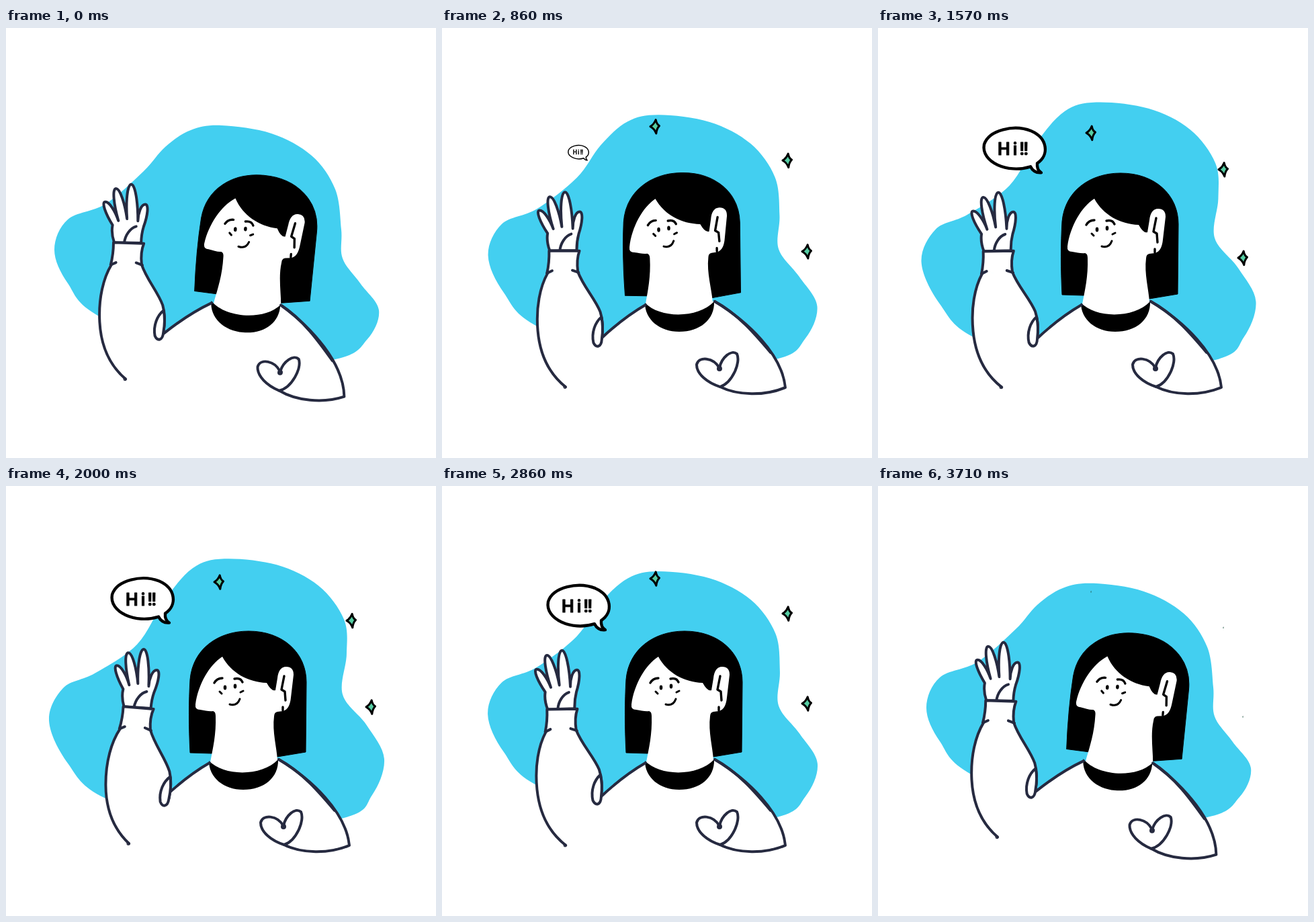
An HTML page that plays this animation: 640 by 640 pixels, repeating every 3780 ms.

```html
<!DOCTYPE html>
<html lang="en">
<head>
<meta charset="utf-8">
<title>Waving hello</title>
<style>
  html, body { margin: 0; width: 100%; height: 100%; overflow: hidden; background: #fff; }
  svg { display: block; width: 100vw; height: 100vh; }
  .ink { fill: none; stroke: #262a40; stroke-width: 4; stroke-linecap: round; stroke-linejoin: round; }
  .black { fill: none; stroke: #000; stroke-width: 3.4; stroke-linecap: round; stroke-linejoin: round; }
  .dot { fill: #262a40; }
  .white { fill: #fff; }
  text { font: 600 25px Inter, "Open Sans", sans-serif; stroke: #000; stroke-width: 1; stroke-linejoin: round; }
</style>
</head>
<body>
<svg viewBox="0 0 640 640">
  <defs>
    <path id="star" class="black" style="fill:#55cda3;stroke-width:3"
      d="M1.2-10Q2.5-3 6.5-1Q2.5 3 1.8 10.5Q-1 3-7 0Q-1.5-3 1.2-10Z"/>
  </defs>

  <path id="blob" fill="#43cff0"/>

  <path id="shirt" class="white" d="M236 463Q270 430 303 412L405 407C455 437 506 485 511 535C480 548 440 547 414 534L190 533Z"/>

  <g id="head">
    <path d="M274 397C272 360 272 320 274 288C278 243 315 216 361 216C412 216 447 248 447 292L446 396L404 403L305 398Z"
      stroke="#000" stroke-linejoin="round"/>
    <path class="white" d="M322 254C303 266 286 295 282 325Q281 333 289 333C296 334 303 336 308 335Q312 336 312 342
      C313 370 308 390 304 411C320 432 390 432 404 408C403 390 396 365 399 343Q399 337 404 336L412 335
      C420 333 423 325 424 315L428 281Q428 269 417 269C409 269 405 276 404 286L401 304Q395 306 388 293
      C360 292 335 278 322 254Z"/>
    <g class="black">
      <path d="M414 283L410 303L415 306L416 319M412 329V334"/>
      <path d="M310 293Q314 286 322 286M340 287Q349 285 352 292"/>
      <path d="M318 306L321 309M349 307L353 305M333 325Q344 328 348 317" stroke-width="3"/>
    </g>
    <ellipse cx="326" cy="300" rx="2.3" ry="3.4"/>
    <ellipse cx="341" cy="298" rx="2.3" ry="3.4"/>
  </g>

  <g id="torso">
    <path d="M302 409C325 433 382 432 405 407C406 434 384 452 353 452C324 452 302 434 302 409Z"/>
    <g class="ink">
      <path d="M236 463Q270 431 303 412"/>
      <path d="M406 407C455 437 506 485 511 535C480 548 440 547 414 534"/>
      <path d="M406 407C440 425 468 458 489 483"/>
      <path d="M414 534C395 528 379 515 379 501C382 488 404 490 413 506C416 490 431 478 439 485C445 498 432 528 414 534"/>
    </g>
    <circle class="dot" cx="413" cy="507" r="4"/>
  </g>

  <g id="arm" class="ink">
    <path class="white" stroke="none" d="M183 532C160 510 149 480 149 445C149 410 158 380 171 361H216L245 433L232 533Z"/>
    <path id="hand" class="white"/>
    <path d="M192 329C194 318 202 308 211 306"/>
    <path class="white" d="M170 361Q175 345 176 328L221 332Q215 345 216 363"/>
    <path d="M170 361L178 358M208 360L217 364"/>
    <path d="M183 532C160 510 149 480 149 445C149 410 158 380 171 361"/>
    <path class="white" d="M216 363C222 385 238 405 244 425C247 438 246 452 243 465"/>
    <path class="white" d="M245 433C235 440 228 455 230 470C233 478 241 479 243 465C246 452 246 440 245 433Z"/>
    <circle class="dot" cx="182" cy="532" r=".6"/>
  </g>

  <use id="starA" href="#star"/>
  <use id="starB" href="#star"/>
  <use id="starC" href="#star"/>

  <g id="bubble">
    <path class="black" style="fill:#fff;stroke-width:4.4" d="M34 22C52 10 50-15 25-26C0-36-38-28-45-6C-50 20-10 38 24 27
      Q29 37 40 36Q33 32 34 22Z"/>
    <text x="-25" y="10" dx="0 4 3 -2">Hi!!</text>
  </g>
</svg>

<script>
const LOOP = 3780, STEP = LOOP / 53;
const $ = id => document.getElementById(id);
const move = (id, transform) => $(id).setAttribute('transform', transform);
const ease = p => (1 - Math.cos(Math.PI * Math.min(1, Math.max(0, p)))) / 2;
const ramp = (t, start, end) => ease((t - start) / (end - start));
const swing = (t, peak, period) => Math.cos(2 * Math.PI * (t - peak) / period);

// Outline points: x, y and their shift when the blob is fully stretched
const blob = [
  [321, 145, 4, -37], [395, 157, 8, -40], [455, 190, 10, -42], [490, 240, 13, -42], [499, 300, 8, -50],
  [501, 343, 0, -33], [528, 381, 9, -25], [555, 420, 8, -14], [538, 463, 7, -3], [490, 493, 13, 1],
  [320, 510, 0, 10], [140, 430, 8, 35], [92, 380, 0, 33], [72, 330, -8, 20], [92, 285, -7, 16],
  [148, 262, -16, 17], [205, 213, -10, 23], [237, 177, -1, -7], [275, 152, 3, -30]
];

// Closed Catmull-Rom curve through the points
function smooth(points) {
  const at = i => points[(i + points.length) % points.length];
  const handle = (i, side) => at(i).map((v, k) => v + side * (at(i + 1)[k] - at(i - 1)[k]) / 6);
  return `M${at(0)}` + points.map((_, i) => `C${handle(i, 1)} ${handle(i + 1, -1)} ${at(i + 1)}`).join('') + 'Z';
}

// Round-tipped fingers rising between neighbouring knuckles
function handPath() {
  const knuckles = [[176, 302], [185, 296], [198, 294], [214, 298], [222, 307]];
  const tips = [[167, 267], [184, 248], [207, 243], [226, 274]];
  let d = `M177 328Q173 314 ${knuckles[0]}`;
  tips.forEach(([x, y], i) => {
    const edge = ([kx, ky], w) => [x + w + (kx - x) / 2, y + (ky - y) / 2];
    d += `C${edge(knuckles[i], -5)} ${x - 6} ${y} ${x} ${y}C${x + 6} ${y} ${edge(knuckles[i + 1], 5)} ${knuckles[i + 1]}`;
  });
  return d + 'Q218 318 217 331Z';
}

const bob = (t, middle, height, peak) => middle - height * swing(t, peak, 2250);

function drawStar(id, t, x, y, start) {
  const size = ramp(t, start, start + 260) * (1 - ramp(t, 3480, 3765));
  move(id, `translate(${x} ${y}) scale(${size})`);
}

function draw(t) {
  const stretch = ease(2 * t / LOOP) * (t < LOOP / 2) || (1 - swing(t, 0, LOOP)) / 2;
  $('blob').setAttribute('d', smooth(blob.map(([x, y, dx, dy]) => [x + dx * stretch, y + dy * stretch])));

  const lean = `rotate(${4.7 * (1 - ramp(t, 0, 900) + ramp(t, 3210, 3680))} 340 449)`;
  move('shirt', lean);
  move('torso', lean);
  const tilt = 5.2 - 7 * ramp(t, 0, 600) + 1.8 * ramp(t, 600, 1250) + 5.2 * ramp(t, 3210, 3690);
  move('head', `rotate(${tilt} 337 468)`);
  const wave = 6 * swing(Math.max(t, 692), 2213, 1014) - 1.8;
  move('arm', `${lean} rotate(${wave} 210 522)`);

  drawStar('starA', t, 317, bob(t, 145, 13, 2500), 550);
  drawStar('starB', t, 514, bob(t, 199, 12, 2600), 240);
  drawStar('starC', t, 543, bob(t, 331, 13, 2500), 370);

  const pop = 1.07 * ramp(t, 720, 1080) - 0.07 * ramp(t, 1080, 1300) - ramp(t, 3440, 3640);
  move('bubble', `translate(203 ${bob(t, 176.3, 11, 2230)}) scale(${pop})`);
}

$('hand').setAttribute('d', handPath());
const begin = performance.now();
function tick() {
  const t = (performance.now() - begin) % LOOP;
  draw(Math.floor(t / STEP + 0.08) * STEP);
  requestAnimationFrame(tick);
}
tick();
</script>
</body>
</html>
```
